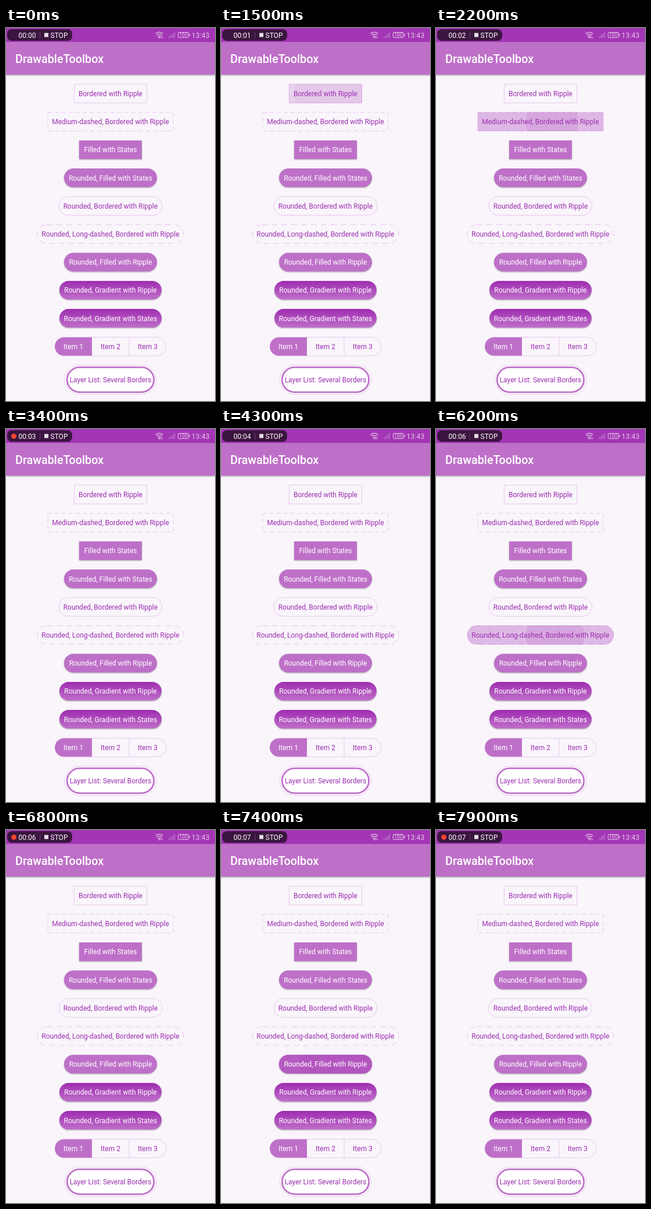
Write an HTML page that moves like this. It is 360 by 640 pixels and loops after 8 s.

```html
<!DOCTYPE html>
<html lang="en">
<head>
<meta charset="utf-8">
<title>DrawableToolbox</title>
<style>
  html, body { margin: 0; width: 100%; height: 100%; overflow: hidden; background: #f9f5fb; }
  svg { display: block; width: 360px; height: 640px; font: 12px Roboto, sans-serif; }
  .mid { text-anchor: middle; }
  .shadow { filter: drop-shadow(0 1px 1px #0005); }
  .bar { filter: drop-shadow(0 1px 1.5px #0006); }
</style>
</head>
<body>
<svg viewBox="0 0 360 640">
  <defs>
    <linearGradient id="fade" x2="0" y2="1">
      <stop stop-color="#9f2cb1"/><stop offset="1" stop-color="#bf70c9"/>
    </linearGradient>
  </defs>
  <rect width="360" height="640" fill="#f9f5fb"/>
  <rect class="bar" y="24" width="360" height="56" fill="#be70c8"/>
  <rect width="360" height="24" fill="#a236b4"/>
  <text x="16" y="59.5" font-size="19.8" font-weight="500" fill="#fff">DrawableToolbox</text>

  <!-- recorder pill -->
  <rect x="2" y="2" width="112" height="20" rx="8" fill="#3b1540"/>
  <circle id="dot" cx="13.5" cy="12.3" r="4.4" fill="#fa4630"/>
  <text id="clock" x="21.5" y="16.5" fill="#fff">00:00</text>
  <path d="M58.5 7v11" stroke="#60406a"/>
  <rect x="66" y="8.5" width="7" height="7" fill="#e4dbe6"/>
  <text x="76.5" y="16.5" fill="#fff">STOP</text>

  <!-- status icons -->
  <g fill="none" stroke="#e6c3ea" stroke-width="1.2">
    <path d="M257.5 10a9 9 0 0 1 13 0M259.5 12.5a6.3 6.3 0 0 1 9 0M261.5 15a3.5 3.5 0 0 1 5 0"/>
    <path d="M280.5 17v-2M283 17v-4M285.500 17v-6M288 17v-8M290.500 17v-10" stroke="#c07acb"/>
    <rect x="296.500" y="7.500" width="18" height="9" rx="1.500" stroke-width="1"/>
    <path d="M316.300 10v4"/>
  </g>
  <circle cx="264" cy="16.500" r="1.200" fill="#e6c3ea"/>
  <path d="M267 14.500v3M269.300 14.500v3" stroke="#e6c3ea"/>
  <text class="mid" x="305.500" y="15.200" font-size="8.500" fill="#e6c3ea">100</text>
  <text x="319.500" y="16.700" font-size="12.500" fill="#e6c3ea">13:43</text>

  <g id="list"></g>

  <!-- segmented control -->
  <path d="M148 530.500h-48a16 16 0 0 0 0 32h48z" fill="#be70c8"/>
  <path d="M148 530.500h112a16 16 0 0 1 0 32h-112M212 530.500v32" fill="none" stroke="#ebc6ec"/>
  <g class="mid" fill="#9c2fb0">
    <text x="116" y="551" fill="#fff">Item 1</text>
    <text x="180" y="551">Item 2</text>
    <text x="244" y="551">Item 3</text>
  </g>

  <!-- layered borders -->
  <rect x="101.500" y="578.500" width="157" height="50" rx="25" fill="#fff" stroke="#ebc6ec"/>
  <rect x="105.200" y="582.200" width="149.600" height="42.600" rx="21.300" fill="#fff" stroke="#be70c8" stroke-width="2.800"/>
  <text class="mid" x="180" y="608.200" fill="#9c2fb0">Layer List: Several Borders</text>
</svg>
<script>
const LOOP = 8000, FILL = '#be70c8', PRESSED = '#a236b4', PURPLE = '#9c2fb0';
const $ = id => document.getElementById(id);
const clamp = v => Math.max(0, Math.min(1, v));

function add(parent, tag, attrs, text = '') {
  const el = document.createElementNS('http://www.w3.org/2000/svg', tag);
  for (const key in attrs) el.setAttribute(key, attrs[key]);
  el.textContent = text;
  return parent.appendChild(el);
}

// press: [start, end] for a state change; ripple: [start, centre x]
const buttons = [
  { label: 'Bordered with Ripple', w: 125, ripple: [900, 207] },
  { label: 'Medium-dashed, Bordered with Ripple', w: 216, dash: '7 5', ripple: [1950, 200] },
  { label: 'Filled with States', w: 108, fill: FILL, press: [2850, 3200] },
  { label: 'Rounded, Filled with States', w: 160, r: 16, fill: FILL, press: [3850, 4250] },
  { label: 'Rounded, Bordered with Ripple', w: 178, r: 16, ripple: [4950, 206] },
  { label: 'Rounded, Long-dashed, Bordered with Ripple', w: 252, r: 16, dash: '10 7', ripple: [5900, 205] },
  { label: 'Rounded, Filled with Ripple', w: 160, r: 16, fill: FILL, ripple: [6950, 200] },
  { label: 'Rounded, Gradient with Ripple', w: 176, r: 16, fill: 'url(#fade)' },
  { label: 'Rounded, Gradient with States', w: 176, r: 16, fill: 'url(#fade)' }
];

buttons.forEach((b, i) => {
  const y = 96.5 + i * 48.2, x = 180 - b.w / 2;
  const box = { x, y, width: b.w, height: 32, rx: b.r || 0 };
  const list = $('list');
  b.body = add(list, 'rect', b.fill
    ? { ...box, fill: b.fill, class: 'shadow' }
    : { ...box, fill: 'none', stroke: '#ebc6ec', 'stroke-dasharray': b.dash || 'none' });
  if (b.ripple) {
    const clip = add(list, 'clipPath', { id: 'clip' + i });
    add(clip, 'rect', { ...box, x: x - .5, y: y - .5, width: b.w + 1, height: 33 });
    b.wave = add(list, 'g', { 'clip-path': `url(#clip${i})`, fill: '#a030b3' });
    add(b.wave, 'rect', { ...box, x: x - .5, y: y - .5, width: b.w + 1, height: 33, 'fill-opacity': .31 });
    b.spot = add(b.wave, 'circle', { cx: b.ripple[1], cy: y + 16, 'fill-opacity': .13 });
  }
  add(list, 'text', { class: 'mid', x: 180, y: y + 20.4, fill: b.fill ? '#fff' : PURPLE }, b.label);
});

function draw(now) {
  const t = now % LOOP;
  // the recorder's seconds last 1100 ms, apart from the first ones
  const beat = t - 600;
  const second = t < 100 ? 0 : Math.max(1, Math.floor(beat / 1100) + 1);
  const lit = t < 1700 ? t >= 390 && t < 1000 : beat % 1100 >= 590;
  $('clock').textContent = '00:0' + second;
  $('dot').style.opacity = lit ? 1 : 0;

  for (const b of buttons) {
    if (b.press) b.body.setAttribute('fill', t >= b.press[0] && t < b.press[1] ? PRESSED : FILL);
    if (b.ripple) {
      const age = t - b.ripple[0];
      b.wave.setAttribute('opacity', Math.min(clamp(age / 150), clamp((800 - age) / 350)));
      b.spot.setAttribute('r', Math.max(0, 20 + age * .1));
    }
  }
}

function frame() {
  draw(performance.now());
  requestAnimationFrame(frame);
}
frame();
</script>
</body>
</html>
```
